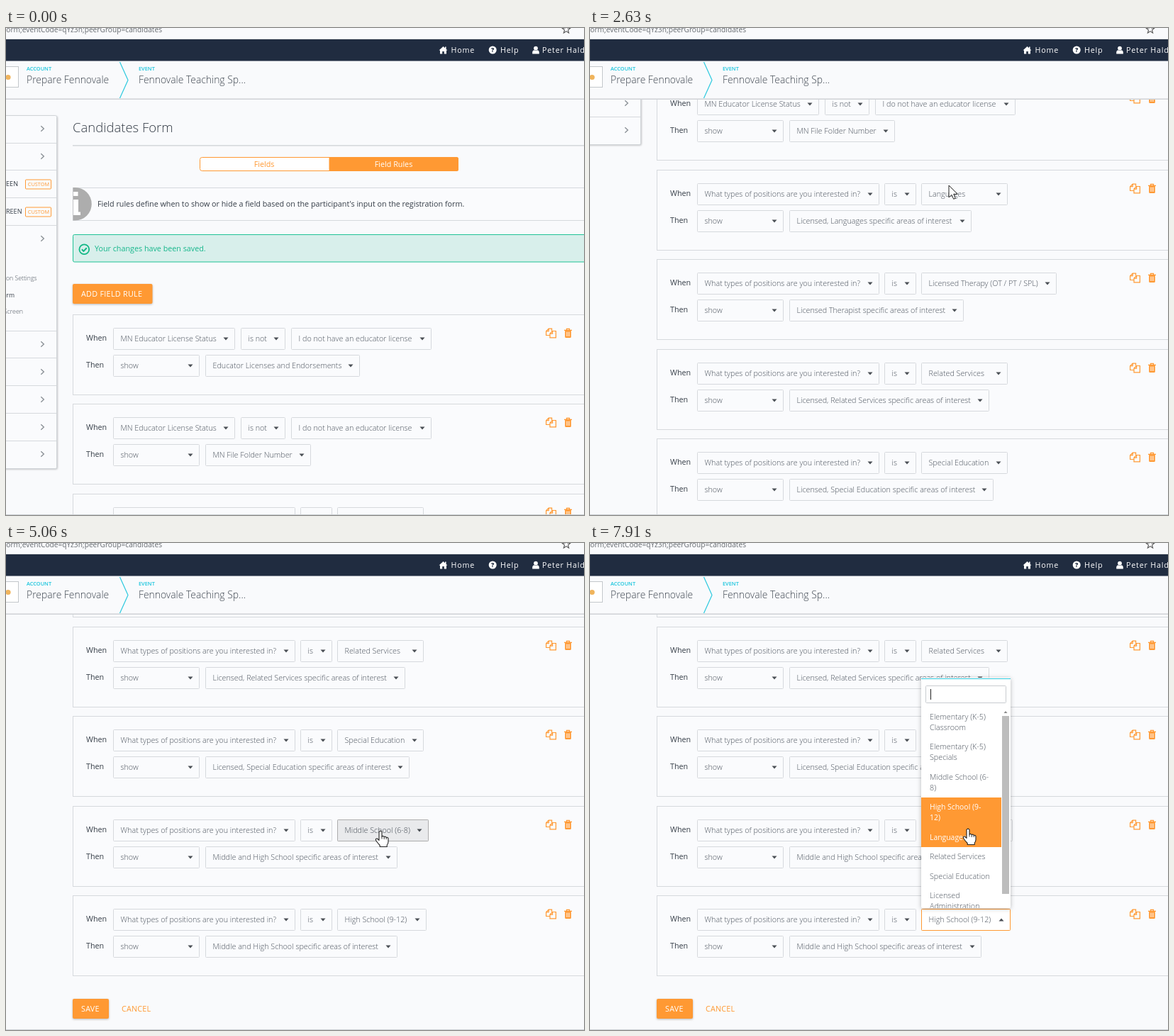
Animation, 815 px wide and 687 px high, one loop 8 s. Source, as an HTML page:

```html
<!DOCTYPE html>
<html lang="en">
<head>
<meta charset="utf-8">
<title>Field rules</title>
<style>
html, body { margin: 0; width: 100%; height: 100%; overflow: hidden; background: #f9fafc; }
svg { display: block; }
text { font: 400 10.75px "Open Sans", "Noto Sans", sans-serif; fill: #353d47; white-space: pre; }
.light { font-weight: 300; fill: #4a525c; }
.lit { font-size: 10.4px; fill: #fff; }
.big { font-weight: 300; font-size: 13.9px; fill: #3c444e; }
.tiny { font-weight: 600; font-size: 7.4px; fill: #16c4dc; }
.title { font-weight: 300; font-size: 18.5px; }
.nav { fill: #fff; letter-spacing: .8px; }
.orange { fill: #ff9933; }
.white { fill: #fff; }
.button { fill: #fff; font-weight: 500; letter-spacing: .3px; }
.raised { filter: drop-shadow(0 1px 1.5px #0004); }
.menu { filter: drop-shadow(0 1px 3px #0004); }
</style>
</head>
<body>
<svg id="stage" width="815" height="687" viewBox="0 0 815 687"></svg>
<script>
const ORANGE = '#ff9933', LINE = '#d6d9dd', BG = '#f9fafc';
const $ = id => document.getElementById(id);

const text = (x, y, s, cls = '', more = '') => `<text x="${x}" y="${y}" class="${cls}" ${more}>${s}</text>`;
const rect = (x, y, w, h, fill, more = '') =>
  `<rect x="${x}" y="${y}" width="${w}" height="${h}" fill="${fill}" ${more}/>`;
const frame = (x, y, w, h, fill = 'none', color = LINE, r = 0) =>
  rect(x, y, w, h, fill, `stroke="${color}" rx="${r}"`);
const path = (d, fill, more = '') => `<path d="${d}" fill="${fill}" ${more}/>`;
const line = (d, color, w = 1) => path(d, 'none', `stroke="${color}" stroke-width="${w}"`);
const at = (x, y, body) => `<g transform="translate(${x} ${y})">${body}</g>`;

// Rule list: [third select, its right edge, target field, its right edge]
const rules = [
  ['I do not have an educator license', 600, 'Educator Licenses and Endorsements', 499],
  ['I do not have an educator license', 600, 'MN File Folder Number', 430],
  ['Languages', 589, 'Licensed, Languages specific areas of interest', 538],
  ['Licensed Therapy (OT / PT / SPL)', 658, 'Licensed Therapist specific areas of interest', 527],
  ['Related Services', 589, 'Licensed, Related Services specific areas of interest', 563],
  ['Special Education', 589, 'Licensed, Special Education specific areas of interest', 569],
  ['Middle School (6-8)', 596, 'Middle and High School specific areas of interest', 552],
  ['High School (9-12)', 593, 'Middle and High School specific areas of interest', 552]
];
const panelTop = i => Math.floor(404 + 126.5 * i) + .5;
const selects = [];

function selectBox(x, y, right, label, open = false, fill = '#fafbfd', border = LINE) {
  const w = right - x, cx = right - 13, d = open ? -2 : 2;
  return frame(x + .5, y, w - 1, 30, fill, border, 1) + text(x + 10.5, y + 18.7, label, 'light') +
    path(`M${cx - 3.5} ${y + 15 - d}h7l-3.5 ${2 * d}z`, '#4a4f55');
}
function select(x, y, right, label) {
  selects.push({ x, y, right });
  return selectBox(x, y, right, label);
}

const copyIcon = line('M6 10H.6V4.2L4.2.6H8.6V4M4.2.6V4.2H.6M6 13.4V7.6L9.6 4H14.4V13.4ZM9.6 4V7.6H6', ORANGE, 1.2);
const trashIcon = line('M0 2.8H11M3.5 2.8V.8H7.5V2.8', ORANGE, 1.3) +
  path('M1.2 3H9.8V12.2Q9.8 13.5 8.5 13.5H2.5Q1.2 13.5 1.2 12.2Z', ORANGE) +
  line('M3.6 5V11.5M5.5 5V11.5M7.4 5V11.5', '#fff', .8);

function rulePanel([third, thirdRight, target, targetRight], i) {
  const y = panelTop(i), a = y + 19, b = y + 57;
  const row = i < 2
    ? select(151, a, 323, 'MN Educator License Status') + select(331, a, 394, 'is not') + select(402, a, thirdRight, third)
    : select(151, a, 408, 'What types of positions are you interested in?') + select(415, a, 460, 'is') + select(467, a, thirdRight, third);
  return frame(94.5, y, 760, 113, '#fafbfd') + text(113, y + 36.5, 'When') + text(113, y + 74.7, 'Then') +
    row + select(151, b, 273, 'show') + select(281, b, targetRight, target) +
    at(761, y + 19, copyIcon) + at(787, y + 19, trashIcon);
}

function sidebar() {
  const rows = [162, 200, 239, 278, 427, 465, 504, 543, 582];
  const chevrons = [142, 181, 297, 446, 485, 524, 563, 601];
  const badge = y => frame(27.5, y - 6.5, 36, 13, 'none', ORANGE, 1) +
    text(46, y + 2.8, 'CUSTOM', 'orange', 'text-anchor="middle" style="font-size:7.4px"');
  const item = (x, y, s, size, cls = '') => text(x, y, s, cls, `text-anchor="end" style="font-size:${size}px"`);
  return `<g style="filter:drop-shadow(1px 1px 1px #0003)">${frame(-9.5, 123.5, 81, 498, '#fafbfd', '#d0d4d8', 2)}</g>` +
    rows.map(y => line(`M0 ${y + .5}H71`, LINE)).join('') +
    chevrons.map(y => line(`M49.3 ${y - 3.7}l4 3.7l-4 3.7`, '#8b9197', 1.4)).join('') +
    item(17, 223, 'SCREEN', 9.1) + item(22.5, 262, 'SCREEN', 9.1) + badge(220.5) + badge(259.5) +
    item(43.5, 355.5, 'Registration Settings', 8.7, 'light') + item(12, 379.5, 'Form', 8.7) +
    item(24, 402.5, 'Screen', 8.9, 'light');
}

function page() {
  return sidebar() + text(94, 147, 'Candidates Form', 'title') + rect(94, 165, 721, 1.6, LINE) +
    frame(273.5, 182.5, 364, 19, '#fff', ORANGE, 3) +
    path('M455.5 182H635.5Q638 182 638 184.5V199.5Q638 202 635.5 202H455.5Z', ORANGE) +
    text(364, 195.8, 'Fields', 'orange', 'text-anchor="middle"') +
    text(546.5, 195.8, 'Field Rules', 'white', 'text-anchor="middle"') +
    frame(94.5, 225.5, 760, 46, '#fafbfd') +
    path('M94.5 225H97.5A23.2 23.2 0 0 1 97.5 271.5H94.5Z', '#adadad') +
    path('M95 231H101.5V237H95ZM95 242H102V259.5H105V264H95Z', '#fff') +
    text(129, 252, "Field rules define when to show or hide a field based on the participant's input on the registration form.") +
    frame(94.5, 291.5, 760, 38.5, '#d8efeb', '#1fc295', 2) +
    `<circle cx="110.3" cy="312.3" r="6.9" fill="none" stroke="#12b886" stroke-width="1.8"/>` +
    line('M106.9 312.3l2.5 2.6l4.4-4.7', '#12b886', 2) +
    text(125, 314.8, 'Your changes have been saved.', '', 'style="fill:#15b68b"') +
    rect(94, 361, 112.5, 28, ORANGE, 'rx="2" class="raised"') + text(106, 379, 'ADD FIELD RULE', 'button') +
    rules.map(rulePanel).join('') +
    rect(94, 1435, 51, 28, ORANGE, 'rx="2" class="raised"') + text(106, 1453, 'SAVE', 'button') +
    text(163, 1453, 'CANCEL', 'orange', 'style="letter-spacing:.2px"');
}

function header() {
  return rect(0, 0, 815, 101, BG) +
    text(220, 6, 'Form;eventCode=qYz3n;peerGroup=candidates', '', 'text-anchor="end" style="font-size:10.2px;fill:#666b70"') +
    line('M790-4l1.6 4l4.1.3l-3.2 2.6l1.1 4l-3.6-2.3l-3.6 2.3l1.1-4l-3.2-2.6l4.1-.3z', '#555', 1.1) +
    rect(0, 15, 815, 1, '#dadde0') + rect(0, 16, 815, 30.5, '#202c40') +
    path('M610.5 31.5L616.5 26L619 28.3V26.5H620.6V29.8L622.5 31.5H621V36.5H617.8V33H615.2V36.5H612V31.5Z', '#fff') +
    text(627.5, 35, 'Home', 'nav') +
    '<circle cx="686.2" cy="31" r="5.5" fill="#fff"/>' +
    text(686.2, 34, '?', '', 'text-anchor="middle" style="font-size:8.5px;font-weight:800;fill:#202c40"') +
    text(697, 35, 'Help', 'nav') +
    '<circle cx="747" cy="28.6" r="2.9" fill="#fff"/>' +
    path('M742.2 36.5V34.5Q742.2 31.5 745 31.2Q747 32.5 749 31.2Q751.8 31.5 751.8 34.5V36.5Z', '#fff') +
    text(756, 35, 'Peter Haldorn', 'nav') +
    frame(-9.5, 54.5, 27, 29, '#fff', '#c3c7cb') + '<circle cx="3" cy="69.5" r="3.6" fill="#f0b45c"/>' +
    text(29, 60.3, 'ACCOUNT', 'tiny') + text(29, 78, 'Prepare Fennovale', 'big') +
    line('M160.5 48L172 73.5L160.5 99', '#2cc9de', 1.2) +
    text(187, 60.3, 'EVENT', 'tiny') + text(187, 78, 'Fennovale Teaching Sp...', 'big') +
    rect(0, 99.5, 815, 1.5, '#cfd2d6');
}

const arrow = path('M0 0V17L4 13.3L6.7 19.3L9.3 18.2L6.7 12.3H12.2Z', '#fff', 'stroke="#222" stroke-linejoin="round"');
const hand = path('M-2 1.5Q0-1.2 2 1.5V8Q4 6.6 5.2 8.6Q7.2 7.4 8.2 9.5Q10.6 8.7 11 11.2V15.5Q11 18 9.2 20V22.5H-.8V20.5Q-4 17.3-6.6 13.2Q-7.2 10.6-4.5 11L-2 13.4Z',
  '#fff', 'stroke="#222" stroke-width="1.1" stroke-linejoin="round"') + line('M2 8V11.5M5.2 8.8V12M8.2 9.6V12', '#222', .9);

// Pop-up list for the last two rules
const menus = [
  { from: 26, to: 32, rule: 6, w: 130, thumb: 260, chosen: 2, high: ['High School (9-12)'], fill: '#e3e3e3', border: '#c9a073' },
  { from: 36, to: 39, rule: 7, w: 126, thumb: 251, chosen: 3, high: ['High School (9-', '12)'], fill: '#fff', border: ORANGE, caret: true }
];
function menuItems(menu, top) {
  let y = top + 41.5;
  return [['Elementary (K-5)', 'Classroom'], ['Elementary (K-5)', 'Specials'], ['Middle School (6-', '8)'], menu.high,
    ['Languages'], ['Related Services'], ['Special Education'], ['Licensed', 'Administration']].map(lines => {
    const item = { lines, y, h: 12.5 + 15 * lines.length };
    y += item.h;
    return item;
  });
}
function drawMenu(menu, cursorY) {
  const [label, right] = rules[menu.rule], y = panelTop(menu.rule) + 19 - END, top = y - 326.5, { w } = menu;
  const rows = menuItems(menu, top).map(({ lines, y, h }, i) => {
    const lit = i === menu.chosen || cursorY >= y && cursorY < y + h;
    const from = Math.floor(y), to = Math.ceil(y + h);
    return (lit ? rect(467, from, w - 13, to - from, ORANGE) : '') +
      lines.map((s, n) => text(479, y + 17.3 + 15 * n, s, lit ? 'lit' : 'light')).join('');
  }).join('');
  const bar = 467 + w - 12;
  return selectBox(467, y, right, label, true, menu.fill, menu.border) +
    `<g class="menu">${rect(467, top, w, 325, '#fff', 'rx="2"')}</g>` + rect(467, top + 1, w, 1, '#2cc9de') +
    frame(473.5, top + 11.5, w - 13, 24, '#fff', '#c8ccd0', 1) +
    (menu.caret ? rect(480, top + 16, 1, 15, '#222') : '') +
    `<clipPath id="list">${rect(467, top + 41, w, 284, '#000')}</clipPath><g clip-path="url(#list)">${rows}</g>` +
    path(`M${bar + 2.5} ${top + 50}h5l-2.5-3z`, '#8a8a8a') + rect(bar, top + 54, 10, menu.thumb, '#bdbdbd');
}

const ticks = [0, 200, 400, 600, 800, 1000, 1200, 1400, 1600, 1800, 2010, 2210, 2420, 2630, 2820, 3020, 3240, 3420, 3630, 3840,
  4040, 4260, 4440, 4660, 4860, 5060, 5260, 5460, 5660, 5880, 6080, 6280, 6480, 6680, 6880, 7080, 7280, 7490, 7700, 7910];
const END = 792;
const scrollKeys = [[0, 0], [9, 0], [10, 31], [11, 130], [12, 290], [13, 457], [14, 612], [15, 729], [16, 788], [17, END]];
const cursorKeys = [[1, 379, 197], [3, 513, 321], [4, 513, 321], [10, 506, 212], [13, 506, 222], [15, 505, 230], [16, 505, 231],
  [20, 404, 460], [21, 398, 455], [22, 392, 440], [23, 385, 408], [24, 450, 410], [25, 528, 406], [26, 528, 406],
  [28, 510, 285], [29, 509, 271], [32, 532, 408], [33, 531, 470], [34, 530, 549], [35, 532, 535], [36, 532, 533], [39, 533, 403]];

function sample(keys, k) {
  const i = keys.findIndex(key => key[0] >= k);
  if (i <= 0) return (i ? keys[keys.length - 1] : keys[0]).slice(1);
  const a = keys[i - 1], b = keys[i], u = (k - a[0]) / (b[0] - a[0]);
  return a.slice(1).map((v, n) => v + (b[n + 1] - v) * u);
}

$('stage').innerHTML = rect(0, 0, 815, 687, BG) + `<g id="page">${page()}<g id="hover"></g></g>` + header() +
  rect(0, 686, 815, 1, '#cfd3d7') + '<g id="menu"></g><g id="cursor"></g>';

function draw(k) {
  const [scroll] = sample(scrollKeys, k), [x, y] = sample(cursorKeys, k);
  const menu = menus.find(m => k >= m.from && k <= m.to);
  const over = k > 20 && !menu && selects.find(s => x >= s.x && x <= s.right && y + END >= s.y && y + END <= s.y + 30);
  $('page').setAttribute('transform', `translate(0 ${-Math.round(scroll)})`);
  $('hover').innerHTML = over
    ? rect(over.x + .5, over.y, over.right - over.x - 1, 30, '#0001', 'stroke="#adadad" rx="1"') : '';
  $('menu').innerHTML = menu ? drawMenu(menu, y) : '';
  $('cursor').innerHTML = k ? at(Math.round(x), Math.round(y), menu || over ? hand : arrow) : '';
}

const start = performance.now();
let shown = -1;
function loop() {
  const t = (performance.now() - start) % 8000;
  const k = ticks.filter(v => v <= t).length - 1;
  if (k !== shown) draw(shown = k);
  requestAnimationFrame(loop);
}
loop();
</script>
</body>
</html>
```
